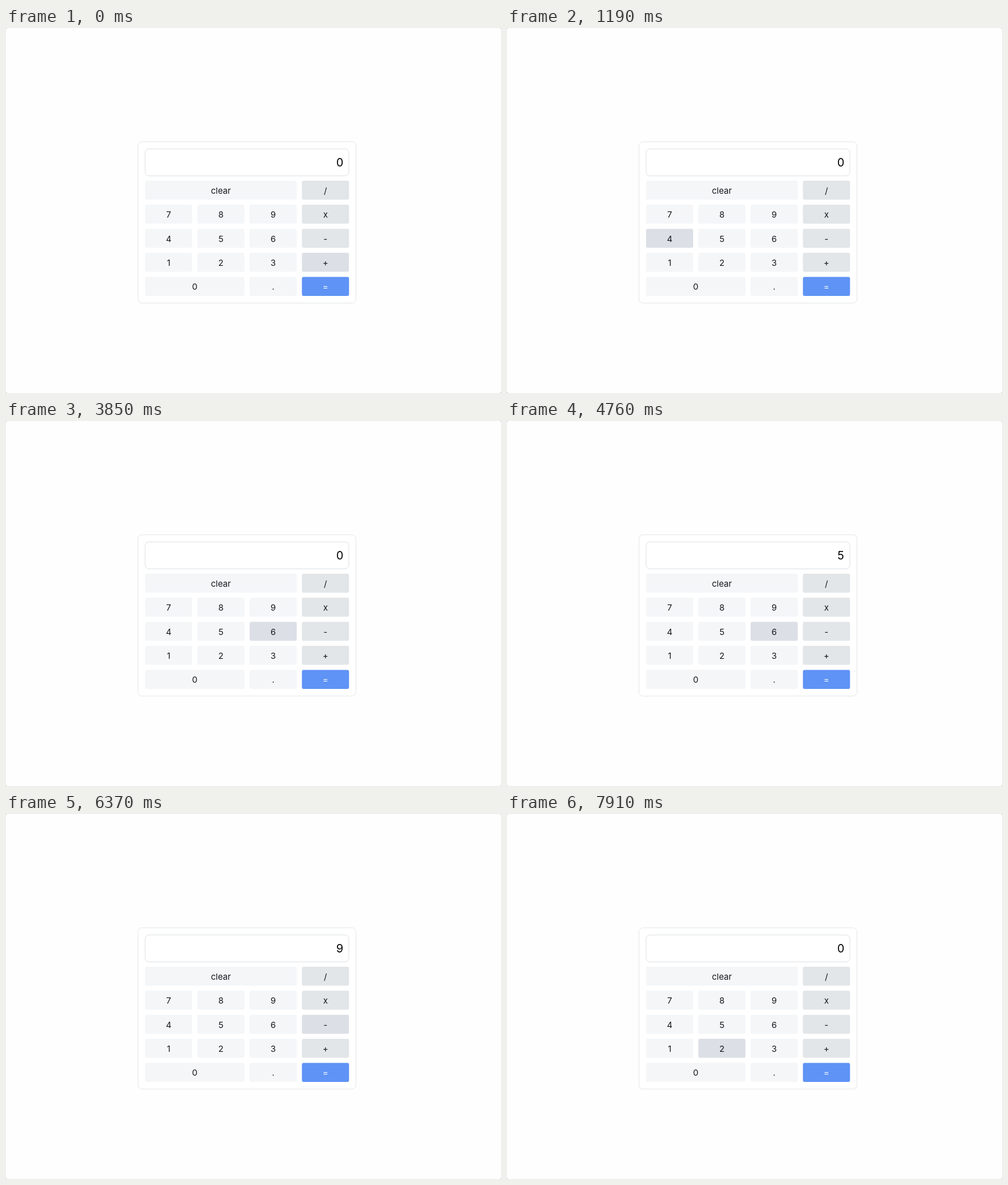
Animation of 872x643 px, one loop 8000 ms. Source, as an HTML page:

```html
<!DOCTYPE html>
<html lang="en">
<head>
<meta charset="utf-8">
<title>Calculator</title>
<style>
  html, body { margin: 0; width: 100%; height: 100%; overflow: hidden; background: #777; }
  svg { display: block; width: 872px; height: 643px; }
  text { font: 15px Inter, Roboto, sans-serif; text-anchor: middle; fill: #16181b; }
  .page { fill: #fefefe; }
  .frame { fill: #fff; stroke: #e3e5e7; }
  .screen { stroke: #dcdfe1; }
  #value { font-size: 20px; fill: #000; }
  .digit rect { fill: #f4f6f8; }
  .op rect { fill: #e2e6e9; }
  .hover rect { fill: #dcdfe6; }
  .equals rect { fill: #5f93f5; }
  .equals.hover rect { fill: #5489ef; }
  .equals text { fill: #fff; }
</style>
</head>
<body>
<svg viewBox="0 0 872 643">
  <rect class="page" width="872" height="643" rx="2"/>
  <rect class="frame" x="232.5" y="200.5" width="384" height="284" rx="7"/>
  <rect class="frame screen" x="245" y="213" width="359" height="47.5" rx="7"/>
  <text id="value" x="588" y="244">0</text>
  <g id="keys"></g>
</svg>
<script>
  const LOOP = 8000;
  const PITCH_X = 92.1, PITCH_Y = 42.35, KEY_W = 83, KEY_H = 33.5;
  const SVG = 'http://www.w3.org/2000/svg';

  // Each row: [label, columns spanned]
  const rows = [
    [['clear', 3], ['/', 1]],
    [['7', 1], ['8', 1], ['9', 1], ['x', 1]],
    [['4', 1], ['5', 1], ['6', 1], ['-', 1]],
    [['1', 1], ['2', 1], ['3', 1], ['+', 1]],
    [['0', 2], ['.', 1], ['=', 1]]
  ];

  // Each step: [start in ms, state]
  const pointer = [
    [0, '+'], [490, '6'], [700, '5'], [910, '4'],
    [2100, '5'], [2240, ''], [2380, '+'],
    [3500, '-'], [3710, '6'], [3920, '5'],
    [4690, '6'], [4900, '+'], [5040, '='],
    [6230, '+'], [6300, '-'], [6440, 'x'], [6510, '/'], [6580, 'clear'],
    [7630, '8'], [7770, '5'], [7840, '2']
  ];
  const readout = [
    [0, '0'], [1680, '4'], [3080, '0'], [4270, '5'], [5460, '9'], [7140, '0']
  ];

  const value = document.getElementById('value');
  const board = document.getElementById('keys');
  const keys = {};

  function add(parent, tag, attrs) {
    const node = document.createElementNS(SVG, tag);
    for (const name in attrs) node.setAttribute(name, attrs[name]);
    return parent.appendChild(node);
  }

  function addKey(label, span, col, row) {
    const x = 245 + col * PITCH_X;
    const y = 269 + row * PITCH_Y;
    const width = KEY_W + (span - 1) * PITCH_X;
    const kind = label === '=' ? 'equals' : col === 3 ? 'op' : 'digit';
    const key = add(board, 'g', { class: kind });
    add(key, 'rect', { x, y, width, height: KEY_H, rx: 3 });
    add(key, 'text', { x: x + width / 2, y: y + 22.8 }).textContent = label;
    keys[label] = key;
  }

  rows.forEach((row, r) => {
    let col = 0;
    for (const [label, span] of row) {
      addKey(label, span, col, r);
      col += span;
    }
  });

  function stateAt(steps, time) {
    let state = steps[0][1];
    for (const [start, next] of steps) if (time >= start) state = next;
    return state;
  }

  function draw(now) {
    const time = now % LOOP;
    const hovered = stateAt(pointer, time);
    for (const label in keys) keys[label].classList.toggle('hover', label === hovered);
    value.textContent = stateAt(readout, time);
  }

  const begin = performance.now();
  function tick() {
    draw(performance.now() - begin);
    requestAnimationFrame(tick);
  }
  tick();
</script>
</body>
</html>
```
